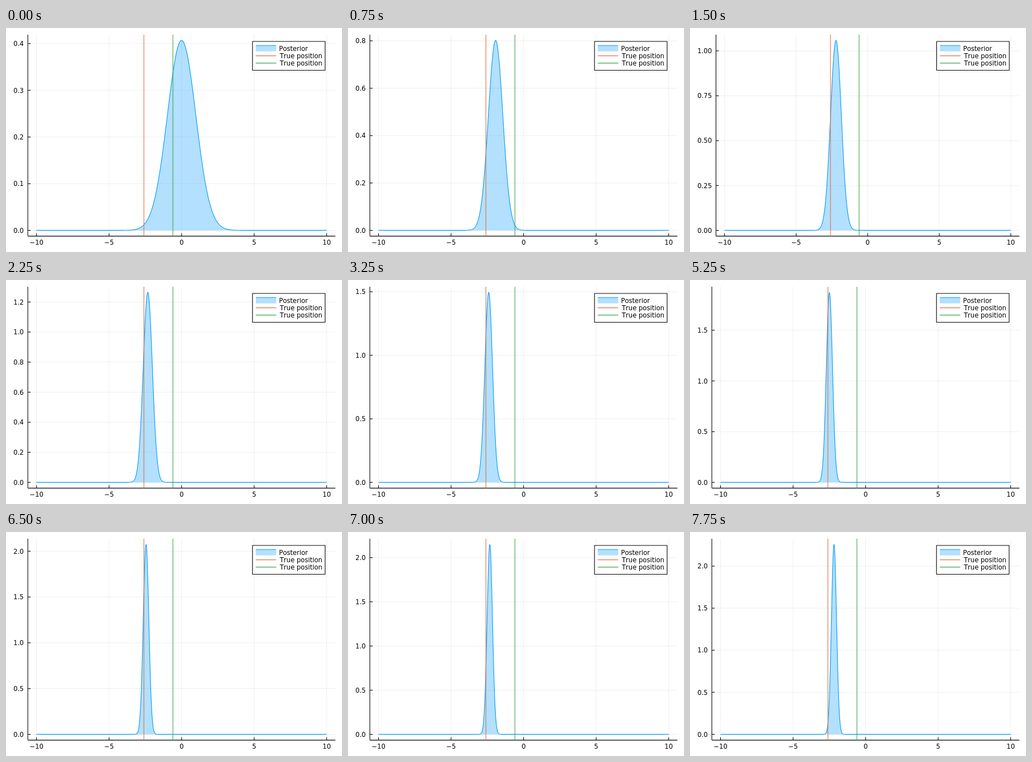
These frames come from a looping animation (600 by 400 pixels, 8000 ms). An HTML page with a canvas:

```html
<!DOCTYPE html>
<html lang="en">
<head>
<meta charset="utf-8">
<title>Posterior</title>
<style>
  html, body { margin: 0; width: 100%; height: 100%; overflow: hidden; background: #fff; }
  canvas { display: block; width: 600px; height: 400px; }
</style>
</head>
<body>
<canvas id="plot" width="600" height="400"></canvas>
<script>
const ctx = document.getElementById('plot').getContext('2d');
const STEP_MS = 250, STEPS = 32;
const BLUE = '#009afa', ORANGE = '#e26f46', GREEN = '#3da44d';
const RIGHT = 588.2, TOP = 12, BOTTOM = 371.6, ZERO = 361.4, PEAK = 22.1;
const TICKS = [.1, .1, .2, .2, .2, .25, .25, .25, .25, .2, .2, .25, .3];

// Conjugate update: prior precision 0.04, one unit of precision per observation.
function posterior(n) {
  const precision = n + 1.04;
  const sum = -2.6 * Math.min(n, 13)
            - 2.65 * Math.max(0, Math.min(n, 25) - 13)
            - 0.7 * Math.max(0, n - 25);
  return { precision, mean: sum / precision, peak: Math.sqrt(precision / (2 * Math.PI)) };
}

function line(x1, y1, x2, y2, color, width = 1.1) {
  ctx.strokeStyle = color;
  ctx.lineWidth = width;
  ctx.beginPath();
  ctx.moveTo(x1, y1);
  ctx.lineTo(x2, y2);
  ctx.stroke();
}

function text(str, x, y, align) {
  ctx.fillStyle = '#000';
  ctx.textAlign = align;
  ctx.fillText(str, x, y);
}

function drawAxes(left, X, Y, peak, tick) {
  const xs = [-10, -5, 0, 5, 10], ys = [];
  for (let i = 0; i * tick <= peak * 1.03; i++) ys.push(i * tick);
  const grid = 'rgba(0,0,0,.065)';
  xs.forEach(v => line(X(v), TOP, X(v), BOTTOM, grid, 1));
  ys.forEach(v => line(left, Y(v), RIGHT, Y(v), grid, 1));
  line(left, BOTTOM, RIGHT, BOTTOM, '#000');
  line(left, TOP, left, BOTTOM, '#000');
  xs.forEach(v => {
    line(X(v), BOTTOM, X(v), BOTTOM - 5, '#000');
    text(String(v).replace('-', '\u2212'), X(v), 387.4, 'center');
  });
  ys.forEach(v => {
    line(left, Y(v), left + 5, Y(v), '#000');
    text(v.toFixed(tick === .25 ? 2 : 1), left - 7.3, Y(v) + 4.3, 'right');
  });
}

function drawCurve(X, Y, { precision, mean, peak }) {
  const curve = new Path2D();
  for (let i = 0; i <= 1000; i++) {
    const x = -10 + i / 50;
    curve.lineTo(X(x), Y(peak * Math.exp(-precision * (x - mean) ** 2 / 2)));
  }
  const area = new Path2D(curve);
  area.lineTo(X(10), ZERO);
  area.lineTo(X(-10), ZERO);
  ctx.fillStyle = 'rgba(0,154,250,.3)';
  ctx.fill(area);
  ctx.strokeStyle = BLUE;
  ctx.lineWidth = 1.1;
  ctx.stroke(curve);
}

function drawLegend(left) {
  const x = RIGHT - (RIGHT - left) / 30 - 129.7;
  ctx.fillStyle = '#fff';
  ctx.fillRect(x, 24, 129.7, 51.5);
  ctx.strokeStyle = '#000';
  ctx.lineWidth = 1.1;
  ctx.strokeRect(x, 24, 129.7, 51.5);
  ctx.fillStyle = 'rgba(0,154,250,.3)';
  ctx.fillRect(x + 5.8, 31.3, 36.6, 10.4);
  line(x + 5.8, 31.3, x + 42.4, 31.3, BLUE);
  line(x + 5.8, 49.6, x + 42.4, 49.6, ORANGE);
  line(x + 5.8, 62.6, x + 42.4, 62.6, GREEN);
  text('Posterior', x + 47.2, 41.2, 'left');
  text('True position', x + 48.8, 54.2, 'left');
  text('True position', x + 48.8, 67.2, 'left');
}

function draw(n) {
  const post = posterior(n), tick = TICKS[n] || .5;
  const left = tick === .25 ? 46.4 : 39;
  const unit = (RIGHT - left) / 21.2, mid = (RIGHT + left) / 2;
  const X = v => mid + v * unit;
  const Y = v => ZERO - v / post.peak * (ZERO - PEAK);

  ctx.fillStyle = '#fff';
  ctx.fillRect(0, 0, 600, 400);
  ctx.font = '11.6px "DejaVu Sans", sans-serif';
  ctx.fontKerning = 'none';
  ctx.lineJoin = 'round';
  drawAxes(left, X, Y, post.peak, tick);
  drawCurve(X, Y, post);
  line(X(-2.6), TOP, X(-2.6), BOTTOM, ORANGE);
  line(X(-.6), TOP, X(-.6), BOTTOM, GREEN);
  drawLegend(left);
}

const start = performance.now();
let shown = 0;
draw(0);
function loop() {
  const n = Math.floor((performance.now() - start) / STEP_MS) % STEPS;
  if (n !== shown) draw(shown = n);
  requestAnimationFrame(loop);
}
requestAnimationFrame(loop);
</script>
</body>
</html>
```
